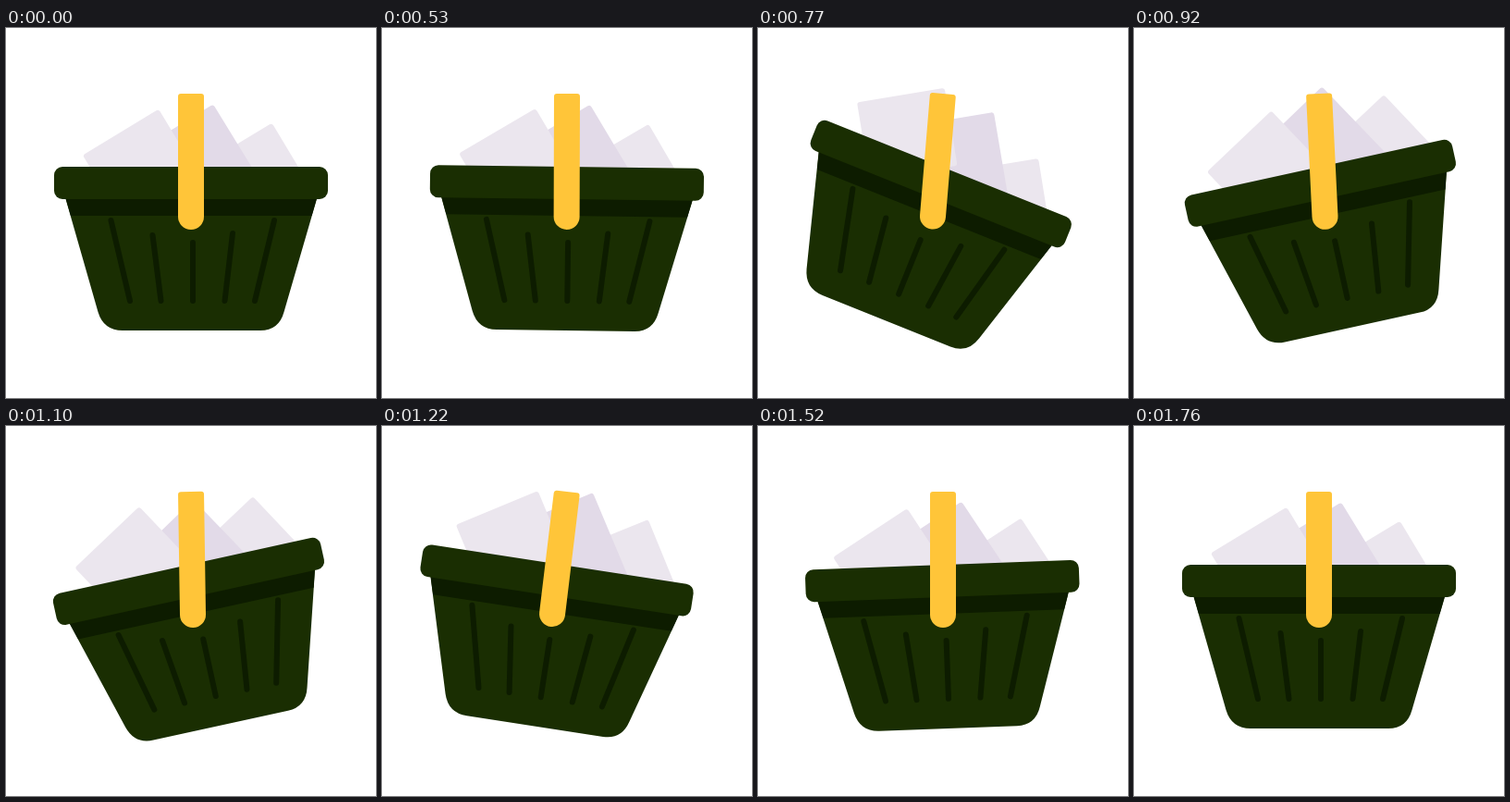
Write an HTML page that moves like this. It is 400x400 px and loops after 1.79 s.

```html
<!DOCTYPE html>
<html>
<head>
<meta charset="utf-8">
<title>Swinging basket</title>
<style>
html, body { margin: 0; width: 100%; height: 100%; overflow: hidden; background: #fff; }
svg { display: block; width: 100vw; height: 100vh; }
</style>
</head>
<body>
<svg viewBox="0 0 400 400">
  <g id="swing">
    <g id="basket">
      <g id="paperC"><rect x="-60" width="60" height="80" rx="3" fill="#ebe6ee" transform="translate(287.5 102.8) rotate(-31)"/></g>
      <g id="paperB"><rect x="-76" width="76" height="118" rx="3" fill="#e2dae8" transform="translate(224 82.5) rotate(-31.5)"/></g>
      <g id="paperA"><rect x="-96" width="96" height="85" rx="3" fill="#ebe6ee" transform="translate(165 87.8) rotate(-31.2)"/></g>
      <path d="M64 183L99.5 307Q105.500 327 126 327H275Q295 327 300.500 307L336.500 183Z" fill="#1a2e02"/>
      <path d="M64.500 184H336L330.500 203H70Z" fill="#0d1c00"/>
      <rect x="52" y="150" width="296" height="35" rx="9" fill="#1a2e02"/>
      <path d="M113.500 208L134 295M158.500 224L167.500 295M202 232V295M245 222L236.500 295M290 208L269 295"
            stroke="#0d1c00" stroke-width="6" stroke-linecap="round"/>
    </g>
    <path d="M186 74q0-3 3-3h22q3 0 3 3V204a14 14 0 0 1-28 0Z" fill="#ffc539"/>
  </g>
</svg>
<script>
const LOOP = 1790, START = 500, STEP = 30;

// Each track lists [step, value] keys, eased in and out between them.
const handle = [[0, 0], [8, 5.2], [14, -2.8], [18, -2.8], [24.5, 7], [32, 0]];
const tilt = [[0, 0], [8, 23], [17, -23], [24.5, 9], [31, -2.5], [42, 0]];
const lifts = {
  paperA: [[0, 0], [9, 18], [17, 4], [22, 14], [32, 0]],
  paperB: [[7, 0], [12, 25], [17, 0], [21, 0], [26, 22], [31, 0]],
  paperC: [[9, 0], [15, 15], [20, 10], [26, 17], [33, 0]]
};

// cubic-bezier(.42, 0, .58, 1)
function ease(x) {
  let lo = 0, hi = 1, u;
  for (let i = 0; i < 24; i++) {
    u = (lo + hi) / 2;
    const bx = 1.26 * u * (1 - u) ** 2 + 1.74 * u * u * (1 - u) + u ** 3;
    if (bx < x) lo = u; else hi = u;
  }
  return u * u * (3 - 2 * u);
}

function valueAt(track, k) {
  const i = track.findIndex(key => key[0] > k);
  if (i < 0) return track[track.length - 1][1];
  if (i === 0) return track[0][1];
  const [k0, v0] = track[i - 1], [k1, v1] = track[i];
  return v0 + (v1 - v0) * ease((k - k0) / (k1 - k0));
}

function place(id, transform) {
  document.getElementById(id).setAttribute("transform", transform);
}

function draw(now) {
  const k = Math.floor(((now - begin) % LOOP - START) / STEP + 1e-6);
  const h = valueAt(handle, k);
  place("swing", `rotate(${h} 200 71)`);
  place("basket", `rotate(${valueAt(tilt, k) - h} 200 187.5)`);
  for (const id in lifts) place(id, `translate(0 ${-valueAt(lifts[id], k)})`);
}

const begin = performance.now();
function tick() {
  draw(performance.now());
  requestAnimationFrame(tick);
}
tick();
</script>
</body>
</html>
```
